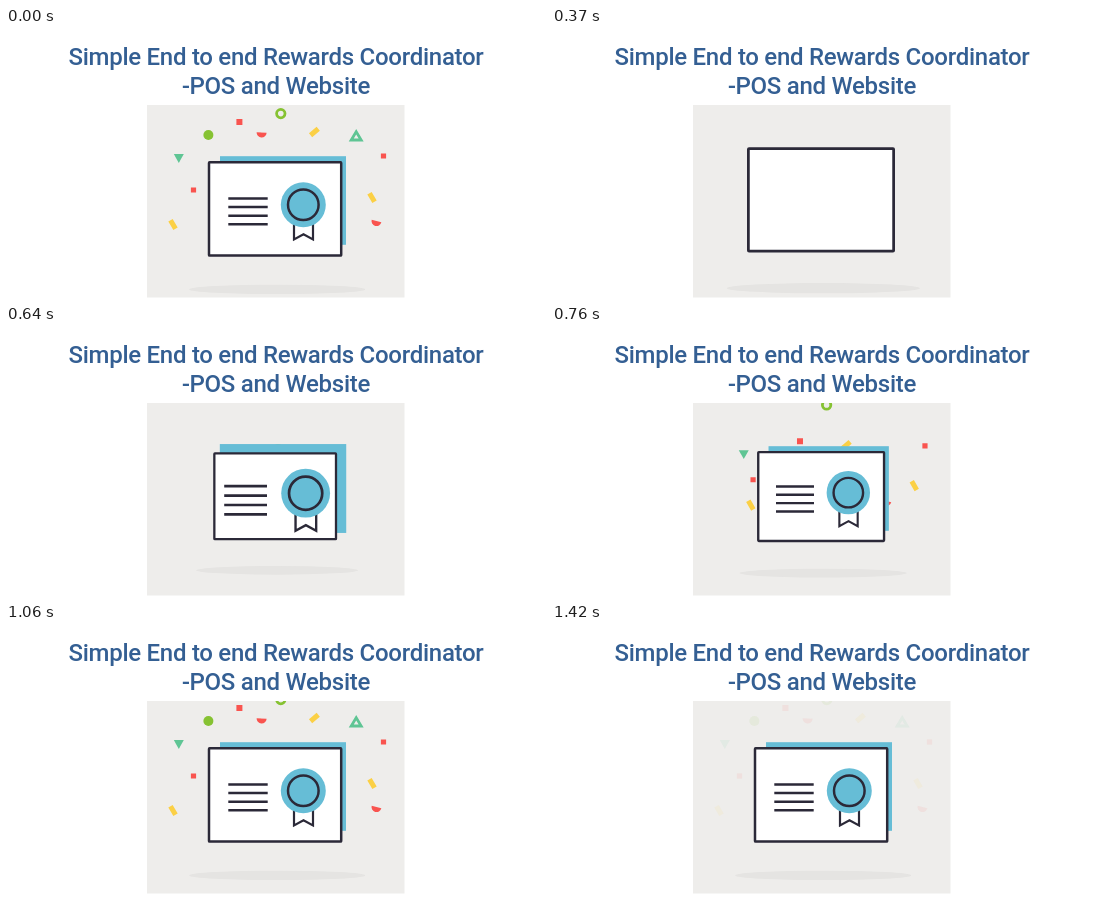
Write an HTML page that moves like this. It is 540 px wide and 270 px high and loops after 1570 ms.

```html
<!DOCTYPE html>
<html lang="en">
<head>
<meta charset="utf-8">
<title>Rewards certificate</title>
<style>
  html, body { margin: 0; height: 100%; overflow: hidden; background: #fff; }
  svg { display: block; width: 100vw; height: 100vh; }
  text { font: 500 24px Roboto, sans-serif; letter-spacing: -.28px; fill: #345f93; text-anchor: middle; }
  .ink { stroke: #2b2938; stroke-width: 2.5; fill: none; }
  .blue { fill: #66bdd6; }
</style>
</head>
<body>
<svg viewBox="0 0 540 270">
  <clipPath id="panel"><rect x="141" y="77" width="257.5" height="192.5"/></clipPath>
  <text x="270" y="37">Simple End to end Rewards Coordinator</text>
  <text x="270" y="66">-POS and Website</text>
  <g clip-path="url(#panel)">
    <rect x="141" y="77" width="258" height="193" fill="#eeedeb"/>
    <g id="scene">
      <ellipse id="shadow" cx="271.2" cy="251.4" rx="88" ry="4.7" fill="#e5e4e2"/>
      <g id="confetti"></g>
      <rect id="backing" class="blue" x="214" y="118.2" width="126" height="88.6"/>
      <rect id="card" class="ink" x="203" y="124.3" width="132.2" height="93.3" rx=".6" style="fill:#fff"/>
      <g id="content">
        <path class="ink" d="M222.3 160.4h39.4m-39.4 8.6h39.4m-39.4 8.7h39.4m-39.4 8.6h39.4"/>
        <path class="ink" style="stroke-width:2.2" d="M288 185v16.5l9.5-5.2 9.5 5.2v-16.5"/>
        <circle class="blue" cx="297.3" cy="166.8" r="22.5"/>
        <circle class="ink" cx="297.3" cy="166.8" r="15.3"/>
      </g>
    </g>
  </g>
</svg>
<script>
const LOOP = 1570, FIRST = 70, STEP = 30, LAST = 1420;
const CX = 270, CY = 162.5;
const $ = id => document.getElementById(id);

const RED = '#f9544f', YELLOW = '#fbd045', GREEN = '#86c232', TEAL = '#5fc594';
const square = 'M-3-3h6v6h-6z';
const smallSquare = 'M-2.6-2.6h5.2v5.2h-5.2z';
const strip = 'M-5-2.5h10v5h-10z';
const bowl = 'M-5-2h10a5 5 0 0 1-10 0z';
const ring = 'M-4.2 0a4.2 4.2 0 1 0 8.4 0a4.2 4.2 0 1 0-8.4 0z';
const dot = 'M-5 0a5 5 0 1 0 10 0a5 5 0 1 0-10 0z';

// shape, colour, resting x and y, rotation, launch time, outline width
const pieces = [
  [ring, GREEN, 274.8, 75.6, 0, 595, 2.8],
  [dot, GREEN, 202.4, 97, 0, 720],
  [square, RED, 233.4, 84, 0, 694],
  [bowl, RED, 255.5, 96.5, 3, 720],
  [strip, YELLOW, 308.4, 94, -40, 689],
  ['M0-4.3L5 4H-5z', TEAL, 350.2, 98, 0, 720, 2.8],
  [smallSquare, RED, 377.5, 118, 0, 597],
  ['M-5-4.3H5L0 4.5z', TEAL, 172.8, 120.4, 0, 655],
  [smallSquare, RED, 187.5, 152, 0, 647],
  [strip, YELLOW, 167, 186.5, 60, 679],
  [strip, YELLOW, 366, 159.5, 60, 595],
  [bowl, RED, 370, 185, 15, 688],
].map(([d, color, x, y, turn, launch, line]) => {
  const node = document.createElementNS('http://www.w3.org/2000/svg', 'path');
  node.setAttribute('d', d);
  node.setAttribute('fill', line ? 'none' : color);
  if (line) {
    node.setAttribute('stroke', color);
    node.setAttribute('stroke-width', line);
  }
  $('confetti').append(node);
  return { node, x, y, turn, launch };
});

// Each layer pops up, overshoots and settles: [time, scale] turning points.
const cardPop = [[106, 0], [355, 1.1], [630, .92], [930, 1]];
const pops = {
  shadow: cardPop,
  card: cardPop,
  backing: [[220, 0], [430, 1.12], [760, .955], [980, 1]],
  content: [[400, 0], [600, 1.1], [800, .95], [1000, 1]],
};

const clamp = v => Math.min(1, Math.max(0, v));

function swing(keys, t) {
  let value = keys[0][1];
  for (let i = 1; i < keys.length; i++) {
    const [t0, v0] = keys[i - 1], [t1, v1] = keys[i];
    if (t >= t0) value = v0 + (v1 - v0) * (1 - Math.cos(Math.PI * clamp((t - t0) / (t1 - t0)))) / 2;
  }
  return value;
}

function draw(time) {
  const opening = time < FIRST;
  // The opening shows the finished scene, slightly lower.
  const t = opening ? 1060 : Math.min(LAST, time - (time - FIRST) % STEP);
  $('scene').setAttribute('transform', `translate(0 ${opening ? 10 : 0})`);
  for (const id in pops) {
    $(id).setAttribute('transform',
      `translate(${CX} ${CY}) scale(${swing(pops[id], t)}) translate(${-CX} ${-CY})`);
  }
  $('confetti').setAttribute('opacity', t < 590 ? 0 : 1 - clamp((t - 1120) / 325));
  for (const { node, x, y, turn, launch } of pieces) {
    const p = 1 - (1 - clamp((t - launch) / 250)) ** 3;
    node.setAttribute('transform',
      `translate(${CX + (x - CX) * p} ${CY + (y - CY) * p}) rotate(${turn})`);
  }
}

function tick() {
  draw(performance.now() % LOOP);
  requestAnimationFrame(tick);
}
tick();
</script>
</body>
</html>
```
